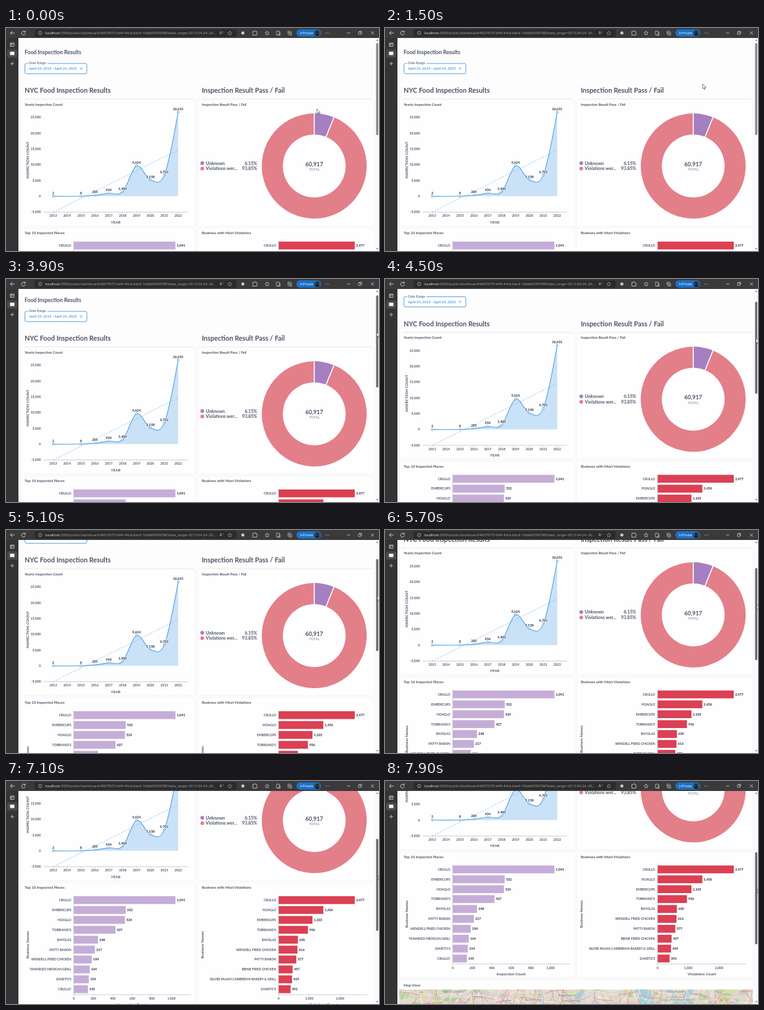
An HTML page that plays this animation: 600 by 358 pixels, repeating every 8000 ms.

```html
<!DOCTYPE html>
<html lang="en">
<head>
<meta charset="utf-8">
<title>Food Inspection Results</title>
<style>
html, body { margin: 0; width: 100%; height: 100%; overflow: hidden; background: #fdfdfd; }
svg { display: block; width: 100%; height: 100%; }
text { font-family: Lato, sans-serif; font-weight: 700; fill: #4c5468; white-space: pre; }
.ui { font-family: "Open Sans", "Noto Sans", sans-serif; font-weight: 400; }
.value { font-weight: 900; fill: #444b5c; }
.halo { paint-order: stroke; stroke: #fff; stroke-width: 1.2px; stroke-linejoin: round; }
</style>
</head>
<body>
<svg id="stage" viewBox="0 0 600 358" preserveAspectRatio="none">
  <defs>
    <clipPath id="view"><rect x="20" y="16" width="580" height="342"/></clipPath>
    <clipPath id="mapClip"><rect x="23" y="542" width="569" height="110"/></clipPath>
    <clipPath id="face"><circle cx="500.5" cy="8" r="5"/></clipPath>
  </defs>
  <g clip-path="url(#view)"><g id="page"></g></g>
  <g id="bar"></g>
  <g id="chrome"></g>
  <g id="cursor"><path d="M0 0V7.6L1.8 6L3 8.7L4.3 8.1L3.1 5.5H5.5Z" fill="#fff" stroke="#444" stroke-width=".7" stroke-linejoin="round"/></g>
</svg>
<script>
const $ = id => document.getElementById(id);
const page = $('page'), chrome = $('chrome'), bar = $('bar');

function el(parent, tag, attrs, text) {
  const node = document.createElementNS('http://www.w3.org/2000/svg', tag);
  for (const k in attrs) node.setAttribute(k, attrs[k]);
  if (text) node.textContent = text;
  return parent.appendChild(node);
}
const rect = (p, x, y, width, height, fill, more) =>
  el(p, 'rect', { x, y, width, height, fill, ...more });
const line = (p, d, stroke, w = 1, more) =>
  el(p, 'path', { d, stroke, fill: 'none', 'stroke-width': w, ...more });
// y is the middle of the capitals
const label = (p, x, y, text, size, more) =>
  el(p, 'text', { x, y: y + size * .36, 'font-size': size, ...more }, text);
const mid = { 'text-anchor': 'middle' }, end = { 'text-anchor': 'end' };
const upright = (x, y, text) =>
  label(page, 0, 0, text, 6.1, { ...mid, transform: `translate(${x} ${y}) rotate(-90)` });
const fmt = n => n.toLocaleString('en-US');

function drawHeader() {
  label(page, 30, 38.5, 'Food Inspection Results', 8.6);
  rect(page, 30.5, 57, 99.5, 16.3, '#fff', { rx: 2, stroke: '#509ee3' });
  rect(page, 35.5, 55.5, 31, 3, '#fdfdfd');
  label(page, 37, 56.3, 'Date Range', 5.4, { style: 'font-weight:400' });
  label(page, 37, 65.2, 'April 24, 2013 - April 24, 2023', 5.7, { style: 'fill:#509ee3' });
  line(page, 'M119 63.2l3.8 3.8m0-3.8l-3.8 3.8', '#509ee3', .8);
}

function drawCards() {
  const card = (x, y, w, h) =>
    rect(page, x, y, w, h, '#fefefe', { rx: 1.5, stroke: '#f0f0f1', 'stroke-width': .8 });
  for (const [x, w] of [[23, 282], [308, 284]]) {
    card(x, 115, w, 203);
    card(x, 321, w, 202);
    line(page, `M${x + 7} 113.5h${w - 10}`, '#ececee', .8);
  }
  card(23, 526, 569, 140);
  label(page, 30, 100.5, 'NYC Food Inspection Results', 10.75);
  label(page, 315, 100.5, 'Inspection Result Pass / Fail', 10.8);
  label(page, 30, 122.5, 'Yearly Inspection Count', 5.8);
  label(page, 315, 122.5, 'Inspection Result Pass / Fail', 5.8);
  label(page, 30, 329, 'Top 10 Inspected Places', 6);
  label(page, 315, 329, 'Business with Most Violations', 5.95);
  label(page, 30, 535.3, 'Map View', 6);
}

// Cardinal spline: each tangent is parallel to the chord of the two neighbours
function smooth(pts) {
  const last = pts.length - 1;
  const handle = (i, side) => pts[i].map((v, k) =>
    i % last ? v + side * (pts[i + 1][k] - pts[i - 1][k]) / 6 : v);
  return `M${pts[0]}` + pts.slice(1).map((p, i) => `C${handle(i, 1)} ${handle(i + 1, -1)} ${p}`).join('');
}

function drawYears() {
  const X = year => 76 + (year - 2013) * 22.33;
  const Y = v => 270.1 - v * .00507;
  const data = [[2013, 2], [2015, 8], [2016, 285], [2017, 934], [2018, 1400],
    [2019, 9624], [2020, 5158], [2021, 6702], [2022, 26631]];
  for (let v = -5000; v <= 25000; v += 5000) label(page, 56, Y(v), fmt(v), 5.25, end);
  line(page, 'M60.5 295.6H293', '#bcc1c8', .8);
  for (let y = 2013; y <= 2022; y++) {
    line(page, `M${X(y)} 295.5v2`, '#bcc1c8', .7);
    label(page, X(y), 301.5, String(y), 5.2, mid);
  }
  label(page, 176.5, 311.5, 'YEAR', 6, mid);
  upright(34.3, 212, 'INSPECTION COUNT');
  const pts = data.map(([y, v]) => [X(y), Y(v)]), d = smooth(pts);
  el(page, 'path', { d: `${d}V${Y(0)}H${X(2013)}Z`, fill: '#509ee3', 'fill-opacity': .3 });
  line(page, `M76 295.6L277 ${Y(14629)}`, '#86bbe6', .9, { 'stroke-dasharray': '2.5 2' });
  line(page, d, '#509ee3', 1.1);
  data.forEach(([, v], i) => {
    const [cx, cy] = pts[i];
    el(page, 'circle', { cx, cy, r: 1.5, fill: '#fff', stroke: '#509ee3', 'stroke-width': .9 });
    label(page, cx, cy - 5.3, fmt(v), 5.3, { ...mid, class: 'value halo' });
  });
}

function drawDonut() {
  const cx = 495.8, cy = 221.5, R = 84.4, r = 50.5;
  const at = (rad, f) => [cx + rad * Math.sin(f * 2 * Math.PI), cy - rad * Math.cos(f * 2 * Math.PI)];
  const slice = (a, b, fill) => {
    const big = b - a > .5 ? 1 : 0;
    el(page, 'path', { fill,
      d: `M${at(R, a)}A${R} ${R} 0 ${big} 1 ${at(R, b)}L${at(r, b)}A${r} ${r} 0 ${big} 0 ${at(r, a)}Z` });
  };
  slice(.0615, 1, '#e37f89');
  slice(0, .0615, '#a57fc0');
  for (const f of [0, .0615]) line(page, `M${at(r - 1, f)}L${at(R + 1, f)}`, '#fff', 1.6);
  label(page, cx, 218.5, '60,917', 9.2, mid);
  label(page, cx, 227, 'TOTAL', 5.7, { ...mid, style: 'font-weight:400;fill:#7d838f' });
  [['Unknown', '6.15%', '#a57fc0'], ['Violations wer...', '93.85%', '#e37f89']].forEach(([name, share, fill], i) => {
    const y = 217 + i * 8.8;
    el(page, 'circle', { cx: 315.7, cy: y, r: 3, fill });
    label(page, 321.3, y, name, 7.15);
    label(page, 404, y, share, 7.2, end);
  });
}

function drawBars(x0, right, unit, step, fill, axis, axisX, rows) {
  rows.forEach(([name, v], i) => {
    const y = 349.2 + i * 15.9;
    rect(page, x0, y - 6.3, v * unit, 12.6, fill);
    label(page, x0 - 4, y, name, 5.15, end);
    label(page, x0 + v * unit + 2.2, y, fmt(v), 5.25, { class: 'value' });
  });
  line(page, `M${x0} 341.5V501H${right}`, '#bcc1c8', .8);
  for (let v = 0; v <= rows[0][1]; v += step) {
    line(page, `M${x0 + v * unit} 501v2`, '#bcc1c8', .7);
    label(page, x0 + v * unit, 507.2, fmt(v), 5.2, mid);
  }
  label(page, axisX, 517, axis, 6.15, mid);
}

function drawMap() {
  const g = el(page, 'g', { 'clip-path': 'url(#mapClip)' });
  let seed = 11;
  const rnd = (a = 1, b = 0) => {
    seed = (seed * 16807) % 2147483647;
    return b + (a - b) * seed / 2147483647;
  };
  rect(g, 23, 542, 569, 110, '#dfd9d2');
  // Greener towards both ends, denser built in the middle
  for (let i = 0; i < 150; i++) {
    const x = rnd(592, 23), green = rnd() < (x < 150 || x > 500 ? .75 : .3);
    el(g, 'ellipse', { cx: x, cy: rnd(570, 540), rx: rnd(10, 2), ry: rnd(4.5, 1.2),
      fill: (green ? ['#b5d49c', '#cfe0ae', '#a9cf9b'] : ['#d3cdc8', '#e9e2d8', '#d9cfd2'])[i % 3] });
  }
  for (const [x, w, dx] of [[312, 8, -8], [400, 25, 8], [450, 12, 12], [486, 8, -9], [247, 3, 6]])
    el(g, 'path', { fill: '#a5cfdb', d: `M${x} 540h${w}c4 8 ${dx} 14 ${dx} 30h${-w}c0-12 4-20 ${-dx}-30z` });
  for (let i = 0; i < 150; i++) {
    const dx = rnd(24, -24);
    line(g, `M${rnd(592, 23)} 540q${rnd(14, -14)} 12 ${dx} 28`,
      ['#f6f3ef', '#efcf94', '#dd8797', '#f3efe9', '#e2a58a'][i % 5], .7);
  }
  for (let i = 0; i < 44; i++)
    line(g, `M${23 + i * 13} ${rnd(566, 543)}q14 ${rnd(8, -8)} 32 ${rnd(7, -7)}`,
      ['#df8495', '#efca90', '#f6f3ef'][i % 3], .8);
  const towns = [[110, 546, 'West Caldwell'], [148, 553.5, 'Verona'], [196, 559.5, 'Nutley'],
    [238, 558.5, 'Rutherford'], [290, 551.5, 'Ridgefield'], [299, 561, 'Cliffside Park'],
    [467, 545.5, 'Manorhaven'], [478, 559, 'Port Washington']];
  for (const [x, y, name] of towns)
    label(g, x, y, name, 5, { ...mid, class: 'ui halo', style: 'fill:#555;stroke-opacity:.6' });
  rect(g, 536, 556, 19, 6.5, '#efe0a8', { rx: 1, stroke: '#a89f80', 'stroke-width': .4 });
  label(g, 545.5, 559.3, 'NY 107', 4.4, { ...mid, class: 'ui', style: 'fill:#555' });
}

function drawChrome() {
  const c = chrome, ink = '#d6d6d6', dim = '#b4b4b4';
  rect(c, 0, 0, 600, 16, '#3a3a3a');
  rect(c, 0, 16, 20, 342, '#343434');
  rect(c, 46, 2, 325, 12, '#2b2b2b', { rx: 2 });
  line(c, 'M14 8H7.2M10 5L7 8l3 3', ink, .9);
  line(c, 'M30.6 6.3A3.1 3.1 0 1 0 31.2 8.6M31 4.2v2.4h-2.4', ink, .9);
  el(c, 'circle', { cx: 55, cy: 8, r: 2.8, fill: 'none', stroke: dim, 'stroke-width': .7 });
  line(c, 'M55 7.5v2M55 6v.8', dim, .7);
  const url = label(c, 63, 7.9, '', 5.66, { class: 'ui', style: 'fill:#a9a9a9' });
  el(url, 'tspan', { fill: '#f2f2f2' }, 'localhost');
  el(url, 'tspan', {}, ':3000/public/dashboard/4607f075-bf4f-44cb-bbc4-16bb69594788?date_range=2013-04-24~20...');
  label(c, 345.5, 8, 'A', 6.2, { ...mid, class: 'ui', style: 'fill:#c4c4c4' });
  line(c, 'M348.6 5.2q1.4 1 0 2.6', dim, .6);
  line(c, 'M360 4.8l1 2.1 2.2.3-1.6 1.6.4 2.3-2-1.1-2 1.1.4-2.3-1.6-1.6 2.2-.3z', dim, .6);
  el(c, 'circle', { cx: 381, cy: 8, r: 2.5, fill: '#c9c9c9' });
  line(c, 'M397 5.5h2.2a1.2 1.2 0 1 1 2.4 0h1.6v2.2a1.2 1.2 0 1 1 0 2.4v1.4H397z', ink, .8);
  line(c, 'M420 4.8l1 2.1 2.2.3-1.6 1.6.4 2.3-2-1.1-2 1.1.4-2.3-1.6-1.6 2.2-.3z', ink, .7);
  line(c, 'M435 5h4.5v6H435zM441 6.3v5.4h-4.5', ink, .7);
  line(c, 'M453.5 5h4.5v5h-4.5zM459.5 6.5v5H455M455.7 6v3M454.2 7.5h3', ink, .6);
  rect(c, 467, 2, 40, 12, '#1a70c4', { rx: 6 });
  label(c, 472.8, 8, 'InPrivate', 5.2, { class: 'ui', style: 'fill:#fff' });
  const face = el(c, 'g', { 'clip-path': 'url(#face)' });
  rect(face, 495, 3, 11, 10, '#34475a');
  el(face, 'circle', { cx: 500.5, cy: 6.8, r: 1.9, fill: '#1d2126' });
  el(face, 'ellipse', { cx: 500.5, cy: 12.4, rx: 3.8, ry: 3.4, fill: '#1d2126' });
  for (const x of [514.5, 517, 519.5]) el(c, 'circle', { cx: x, cy: 8, r: .6, fill: ink });
  line(c, 'M548.5 8h5', ink, .8);
  line(c, 'M567 6.5h3.8v3.8H567zM568.3 6.3V5.2h3.8V9h-1.1', ink, .7);
  line(c, 'M587 5.5l5 5m0-5l-5 5', ink, .8);
  line(c, 'M7 24h6v5.5H7zM7 25.7h6M9 25.7v3.8', ink, .8);
  rect(c, 2, 34.5, 16, 13, '#4a4a4a', { rx: 2 });
  rect(c, 6.5, 38, 7, 5.6, '#f4f4f4', { rx: .6 });
  line(c, 'M10 54.2v6M7 57.2h6', ink, .8);
}

drawHeader();
drawCards();
drawYears();
drawDonut();
drawBars(109, 297, .1571, 200, '#c5add8', 'Inspection Count', 203, [
  ['CRULLO', 1041], ['EMBERCUPS', 532], ['HOAGLO', 524], ["TOBRIAND'S", 427], ['BAYOLAS', 248],
  ['PATTY BARON', 217], ['WENDELL FRIED CHICKEN', 184], ['TAMARIZO MEXICAN GRILL', 164],
  ["ZANETO'S", 154], ["CRULLO'", 145]]);
drawBars(438.4, 581, .0495, 1000, '#db4053', 'Violations Count', 509.7, [
  ['CRULLO', 2477], ['HOAGLO', 1456], ['EMBERCUPS', 1103], ["TOBRIAND'S", 956], ['BAYOLAS', 630],
  ['WENDELL FRIED CHICKEN', 616], ['PATTY BARON', 577], ['BRINE FRIED CHICKEN', 457],
  ['SILVER PALMA CARIBBEAN BAKERY & GRILL', 439], ["ZANETO'S", 392]]);
upright(34.3, 421, 'Business Names');
upright(316.2, 421, 'Business Names');
drawMap();
drawChrome();

rect(bar, 594, 16, 6, 342, '#fafafa');
line(bar, 'M595.6 20.4l1.6-2 1.6 2zM595.6 353.6l1.6 2 1.6-2z', '#8a8a8a', .5, { style: 'fill:#8a8a8a' });
const thumb = rect(bar, 595.3, 24, 3.6, 148, '#8c8c8c', { rx: 1.8 });

const scrollSteps = [[3400, 0], [3900, 5], [5100, 52], [6300, 118.5], [7100, 158], [7900, 207.3]];
const mouseX = [[0, 500], [900, 509], [1500, 511], [1900, 514], [2600, 596], [3900, 596.3], [5100, 597.5], [6300, 598.8]];
const mouseY = [[0, 130], [900, 96], [1500, 90], [1900, 88], [2600, 83]];

function track(steps, t) {
  const i = steps.findIndex(s => s[0] > t);
  if (i < 0) return steps[steps.length - 1][1];
  if (!i) return steps[0][1];
  const [t0, a] = steps[i - 1], [t1, b] = steps[i];
  return a + (b - a) * (t - t0) / (t1 - t0);
}

const LOOP = 8000, TICK = 100, THUMB = .435;
function draw(now) {
  const t = Math.floor((now % LOOP) / TICK) * TICK;
  const top = track(scrollSteps, t);
  page.setAttribute('transform', `translate(0 ${-top})`);
  thumb.setAttribute('y', 24 + top * THUMB);
  thumb.setAttribute('fill', t >= 2600 ? '#6c6c6c' : '#8c8c8c');
  $('cursor').setAttribute('transform', `translate(${track(mouseX, t)} ${track(mouseY, t) + top * THUMB})`);
}
const start = performance.now();
function loop() {
  draw(performance.now() - start);
  requestAnimationFrame(loop);
}
loop();
</script>
</body>
</html>
```
